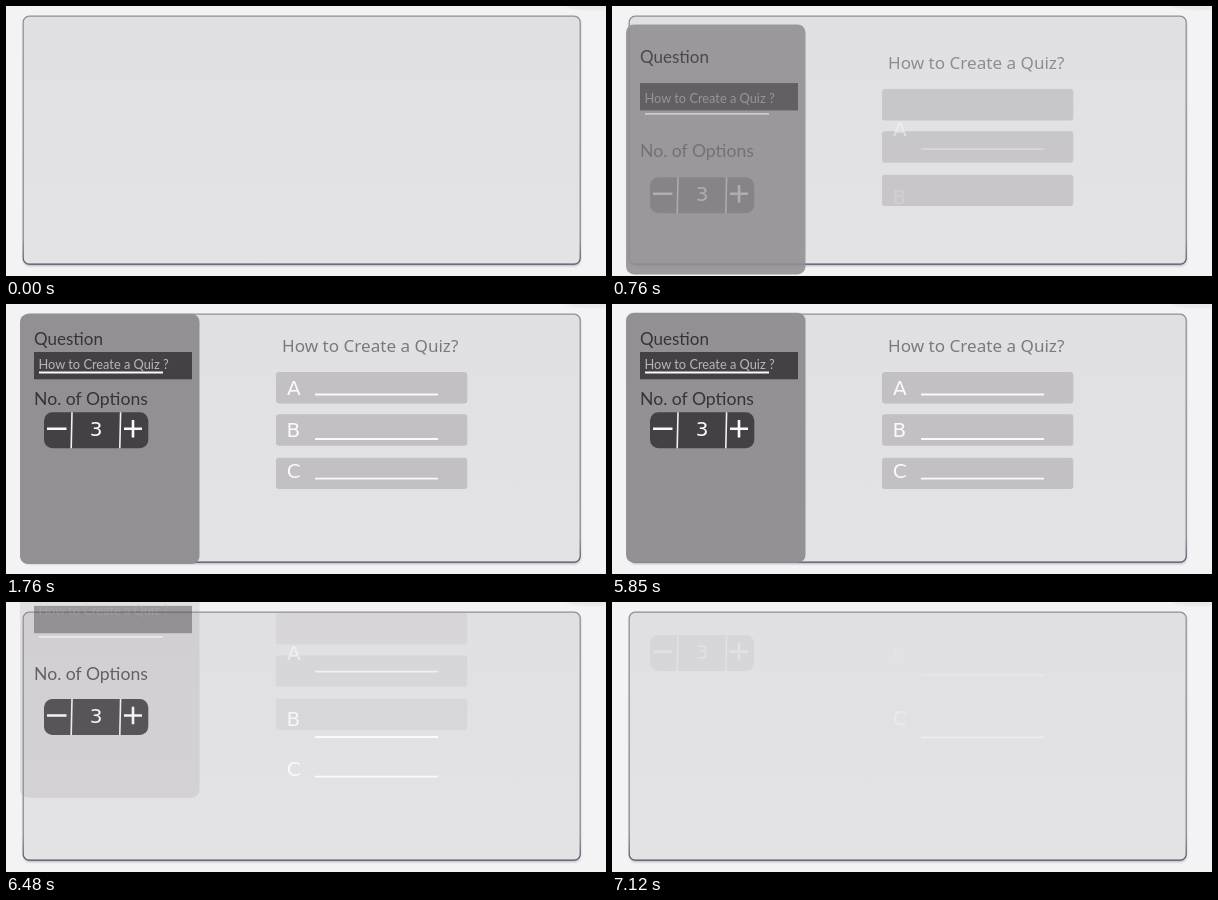
Recreate the animation shown at these times as an HTML page. Size 600 px wide and 270 px high, loop 8 s.

```html
<!DOCTYPE html>
<html lang="en">
<head>
<meta charset="utf-8">
<title>Quiz builder</title>
<style>
  html, body { margin: 0; width: 100%; height: 100%; overflow: hidden; background: #f3f2f4; }
  svg { display: block; width: 100%; height: 100%; }
  .label { font-family: Lato, "Open Sans", sans-serif; fill: #353437; }
  .entry { font: 12.8px Lato, "Open Sans", sans-serif; fill: #b9b7ba; }
  .title { font: 17.1px "Noto Sans", "Open Sans", sans-serif; fill: #7b797c; }
  .glyph { font: 20px "DejaVu Sans", sans-serif; fill: #fafafa; }
  .dark { fill: #434144; }
  .box { fill: #c2c0c2; }
  .rule { stroke: #fafafa; stroke-width: 1.8; }
  .sign { stroke: #fafafa; stroke-width: 2.6; }
  .split { stroke: #f2f2f2; stroke-width: 1.6; }
  [data-in] { opacity: 0; }
</style>
</head>
<body>
<svg viewBox="0 0 600 270">
  <defs>
    <linearGradient id="fill" x2="0" y2="1">
      <stop stop-color="#e0dfe1"/>
      <stop offset="1" stop-color="#e3e2e4"/>
    </linearGradient>
    <linearGradient id="edge" x2="0" y2="1">
      <stop stop-color="#8f8e93"/>
      <stop offset=".9" stop-color="#82858e"/>
      <stop offset="1" stop-color="#4b5164"/>
    </linearGradient>
    <filter id="soft"><feGaussianBlur stdDeviation="1"/></filter>
  </defs>

  <ellipse cx="586" cy="0" rx="26" ry="4" fill="#e8e7e9" filter="url(#soft)"/>
  <rect x="17.5" y="12" width="557" height="248" rx="6" fill="#8d90a0" opacity=".6" filter="url(#soft)"/>
  <rect x="17.2" y="10.2" width="557" height="248" rx="6" fill="url(#fill)" stroke="url(#edge)" stroke-width="1.2"/>

  <!-- data-in: moment of arrival, data-out: moment of departure (ms) -->
  <rect data-in="845" data-out="5838" x="14" y="10" width="179.5" height="250" rx="8" fill="#929093"/>
  <text data-in="920" data-out="5912" class="label" font-size="17" x="28" y="41">Question</text>
  <rect data-in="1052" data-out="6040" class="dark" x="28" y="48" width="158" height="27.3"/>
  <text data-in="1078" data-out="5960" class="entry" x="32.5" y="65">How to Create a Quiz ?</text>
  <path data-in="1155" data-out="6145" class="rule" d="M33 68.5H157"/>
  <text data-in="1257" data-out="6247" class="label" font-size="17.6" x="28" y="101">No. of Options</text>
  <g data-in="1390" data-out="6368">
    <rect class="dark" x="38" y="108.3" width="104.3" height="36" rx="8.5"/>
    <path class="split" d="M66 108.3L65.2 144.3M114.6 108.3L113.8 144.3"/>
    <path class="sign" d="M41 124.8H60.5M118 124.8H136M127 116V133.5"/>
    <text class="glyph" x="83.7" y="132">3</text>
  </g>

  <g data-in="912" data-out="5912">
    <text class="title" x="276" y="48.3">How to Create a Quiz?</text>
    <rect class="box" x="270" y="68" width="191.3" height="31.5" rx="3"/>
    <rect class="box" x="270" y="110.2" width="191.3" height="31.5" rx="3"/>
    <rect class="box" x="270" y="153.7" width="191.3" height="31.3" rx="3"/>
  </g>
  <text data-in="1160" data-out="6155" class="glyph" x="281" y="90.5">A</text>
  <path data-in="1287" data-out="6272" class="rule" d="M309 90.5H432"/>
  <text data-in="1415" data-out="6392" class="glyph" x="280.4" y="132.5">B</text>
  <path data-in="1535" data-out="6500" class="rule" d="M309 135H432"/>
  <text data-in="1648" data-out="6612" class="glyph" x="280.8" y="174">C</text>
  <path data-in="1760" data-out="6726" class="rule" d="M309 174.7H432"/>
</svg>
<script>
  const LOOP = 8000, HALT = 7120, SPAN = 800, RISE = 80;
  const clamp = v => Math.min(1, Math.max(0, v));
  const parts = [...document.querySelectorAll('[data-in]')].map(el => ({
    el, arrive: +el.dataset.in, leave: +el.dataset.out
  }));

  function draw(time) {
    const t = Math.min(time % LOOP, HALT);
    for (const { el, arrive, leave } of parts) {
      const below = t < 60 ? 1 : clamp((arrive - t) / SPAN);
      const above = clamp((t - leave) / SPAN);
      el.style.opacity = 1 - below - above;
      el.setAttribute('transform', `translate(0 ${(RISE * (below - above)).toFixed(2)})`);
    }
  }

  const start = performance.now();
  function tick() {
    draw(performance.now() - start);
    requestAnimationFrame(tick);
  }
  tick();
</script>
</body>
</html>
```
